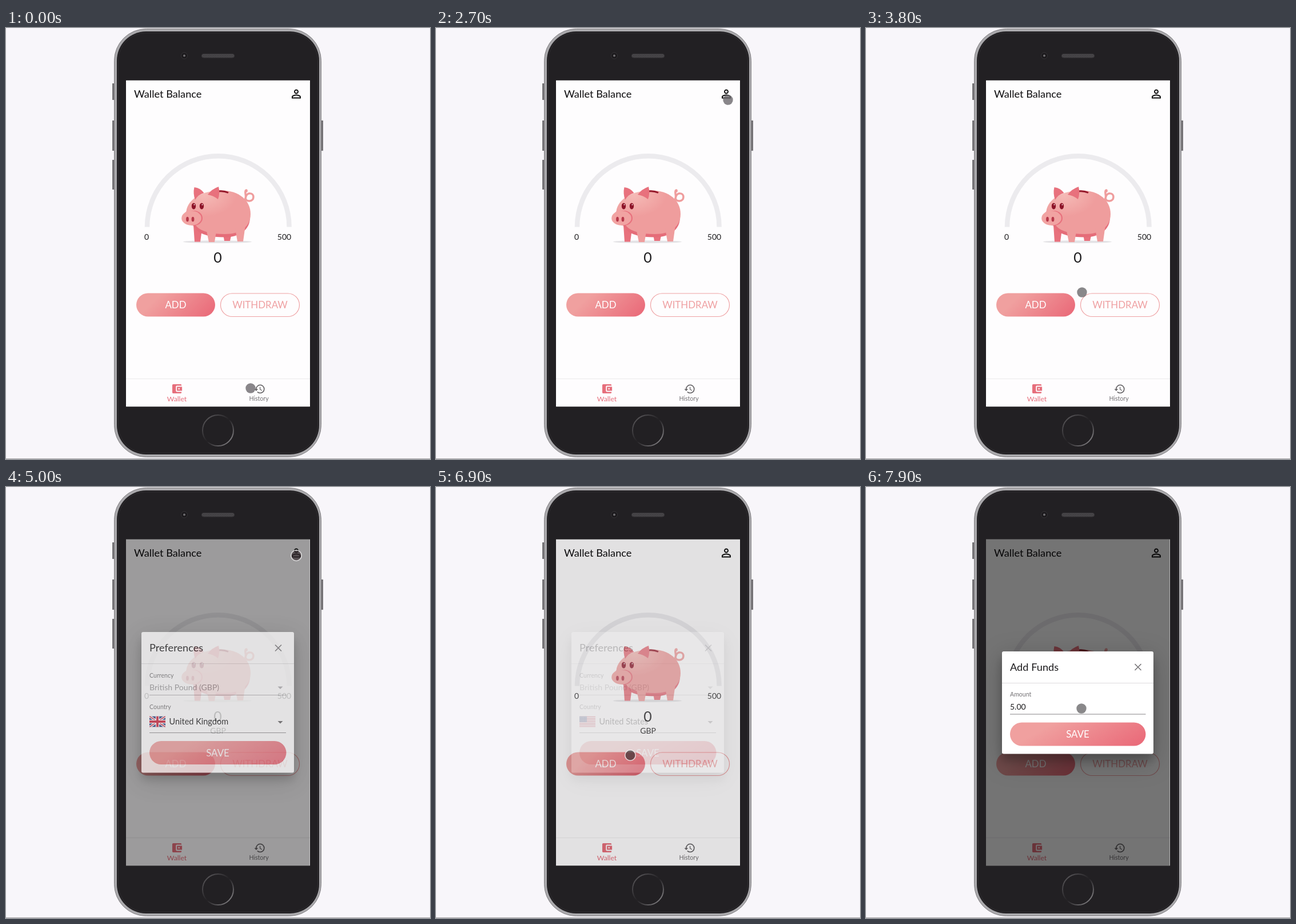
An HTML page for the animation above (8 s loop, 742 by 755 pixels).

```html
<!DOCTYPE html>
<html lang="en">
<head>
<meta charset="utf-8">
<title>Wallet Balance</title>
<style>
html, body { margin: 0; width: 100%; height: 100%; overflow: hidden; background: #f8f6fa }
svg { display: block }
text { font: 14.5px Lato, "Open Sans", sans-serif; fill: #1c1b1d }
.title { font-size: 18.2px }
.btn { font-size: 16.9px; fill: #fff; text-anchor: middle }
.mid { text-anchor: middle }
.num { font-size: 14px }
.label { font-size: 10.6px; fill: #737174 }
.paper { fill: #fff; filter: drop-shadow(0 12px 8px rgba(0,0,0,.2)) drop-shadow(0 10px 22px rgba(0,0,0,.22)) }
.x { stroke: #777578; stroke-width: 1.6 }
</style>
</head>
<body>
<svg width="742" height="755" viewBox="0 0 742 755">
<defs>
  <linearGradient id="pink" x1="0" y1=".35" x2="1" y2=".65">
    <stop offset=".2" stop-color="#f0a09f"/><stop offset="1" stop-color="#ea6d7b"/>
  </linearGradient>
  <linearGradient id="ring" x1="0" y1="0" x2="1" y2="1">
    <stop offset=".1" stop-color="#575558"/><stop offset=".5" stop-color="#232124"/><stop offset=".9" stop-color="#828083"/>
  </linearGradient>
  <radialGradient id="skin" cx=".28" cy=".1" r=".5">
    <stop offset="0" stop-color="#f5bab6"/><stop offset="1" stop-color="#ef9d9d"/>
  </radialGradient>
  <pattern id="mesh" width="3" height="3" patternUnits="userSpaceOnUse">
    <path d="M0 0h3v3H0z" fill="#4b494c"/><path d="M0 0h1v1H0zM1.5 1.5h1v1h-1z" fill="#2d2b2e"/>
  </pattern>
  <clipPath id="screen"><path d="M210 91.5h322v572H210z"/></clipPath>
  <path id="body" d="M315.500 322C317 298 348 284.500 376 284.500C408 284.500 428 302 428 326C428 348 410 361 383 361C360 361 342 357 333 347Z"/>
  <symbol id="uk" viewBox="0 0 28 19">
    <path d="M0 0h28v19H0z" fill="#25397c"/>
    <path d="M0 0L28 19M28 0L0 19" stroke="#fff" stroke-width="4"/>
    <path d="M0 0L28 19M28 0L0 19" stroke="#cf2740" stroke-width="1.5"/>
    <path d="M14 0v19M0 9.5h28" stroke="#fff" stroke-width="6.4"/>
    <path d="M14 0v19M0 9.5h28" stroke="#cf2740" stroke-width="3.8"/>
  </symbol>
  <symbol id="us" viewBox="0 0 28 19">
    <path d="M0 0h28v19H0z" fill="#fff"/>
    <path d="M14 0v19" stroke="#c8354a" stroke-width="28" stroke-dasharray="1.46"/>
    <path d="M0 0h13v10.2H0z" fill="#36427c"/>
    <path d="M1 2h11M1 5h11M1 8h11" stroke="#fff" stroke-dasharray="1 1.5"/>
  </symbol>
</defs>

<!-- Phone -->
<path d="M0 754.5h742" stroke="#a3a1a4"/>
<path d="M186 97h5v29h-5zM186 162h5v53h-5zM186 231h5v52h-5zM550 162h5v53h-5z" fill="#757376"/>
<rect x="189.5" y="1.5" width="362" height="750" rx="56" fill="#aaa9ac" stroke="#828083"/>
<rect x="194" y="6" width="354" height="741" rx="51" fill="#222023"/>
<rect x="196.5" y="8.5" width="349" height="736" rx="48.5" fill="none" stroke="#2e2c2f"/>
<rect x="342.5" y="45.5" width="57" height="6.5" rx="3.2" fill="url(#mesh)" stroke="#3b393c"/>
<circle cx="312" cy="48.5" r="5.5" fill="#1b191c" stroke="#363437"/>
<circle cx="312" cy="48.5" r="2" fill="#6f6d70"/>
<circle cx="371" cy="705" r="27" fill="none" stroke="url(#ring)" stroke-width="2"/>

<g clip-path="url(#screen)">
  <path d="M210 91.5h322v572H210z" fill="#fefdfe"/>
  <text class="title" x="224" y="121.7" style="fill:#0c0b0d">Wallet Balance</text>
  <path transform="translate(496 103.5)" fill="#111" d="M12 5.9a2.1 2.1 0 1 1 0 4.2 2.1 2.1 0 0 1 0-4.2m0 9c2.97 0 6.1 1.46 6.1 2.1v1.1H5.9V17c0-.64 3.13-2.1 6.1-2.1M12 4C9.79 4 8 5.79 8 8s1.79 4 4 4 4-1.79 4-4-1.79-4-4-4zm0 9c-2.67 0-8 1.34-8 4v3h16v-3c0-2.66-5.33-4-8-4z"/>

  <path d="M247 348.5a124.3 124.3 0 0 1 248.6 0" fill="none" stroke="#ecebee" stroke-width="8.5"/>
  <text class="num mid" x="246" y="371">0</text>
  <text class="num mid" x="487" y="371">500</text>

  <!-- Piggy bank -->
  <ellipse cx="370" cy="374.5" rx="60" ry="2.3" fill="#e3e2e5"/>
  <path d="M328 345h16l-4 29.5h-10zM379 355h17l-4 18h-10z" fill="#e8717d"/>
  <use href="#body" x="-1" y="5.5" fill="#e56d79"/>
  <use href="#body" fill="url(#skin)"/>
  <path d="M350 350h19l-4 25h-10zM400 345h19l-4 29h-10z" fill="#ef9d9d"/>
  <path d="M372 286q9-1 17 2.5" fill="none" stroke="#951a2c" stroke-width="3"/>
  <path d="M414 304c7-2 6-9 5-14c-1-7 3-7 2-4M419 298c1 7 14 7 14-2c0-8-11-8-13-1" fill="none" stroke="#ef9d9d" stroke-width="3.5" stroke-linecap="round"/>
  <path d="M329.5 279Q340 280 346.5 289Q336 292 331 301Q327 290 329.5 279ZM372 278Q360 282 353 292Q362 293 371 300Q375 289 372 278Z" fill="#e8717d"/>
  <g fill="#8e1428">
    <ellipse cx="328.5" cy="312" rx="3.7" ry="5.5"/><ellipse cx="342.5" cy="312" rx="3.7" ry="5.5"/>
  </g>
  <g fill="#fff"><circle cx="329.5" cy="309.5" r="1"/><circle cx="343.5" cy="309.5" r="1"/></g>
  <ellipse cx="329" cy="333" rx="15" ry="13" fill="#e8717d"/>
  <ellipse cx="324.5" cy="333" rx="17.3" ry="12.7" fill="#f1a3a2"/>
  <g fill="#b8384a">
    <ellipse cx="317.5" cy="335" rx="2.4" ry="4.2"/><ellipse cx="327" cy="335" rx="2.4" ry="4.2"/>
  </g>

  <text class="mid" x="370.5" y="411.3" style="font-size:25px">0</text>
  <text id="unit" class="num mid" x="371" y="431.5">GBP</text>

  <rect x="228" y="464.5" width="138" height="41" rx="20.5" fill="url(#pink)"/>
  <text class="btn" x="297" y="491">ADD</text>
  <rect x="375.5" y="465" width="138" height="40.5" rx="20.2" fill="none" stroke="#efa2a4" stroke-width="1.2"/>
  <text class="btn" x="444.5" y="491" style="fill:#efa0a2">WITHDRAW</text>

  <path d="M210 614.5h322" stroke="#efeef0" stroke-width="1.5"/>
  <path transform="translate(288.3 621.2) scale(.9)" fill="#e66f7c" d="M21 18v1c0 1.1-.9 2-2 2H5c-1.11 0-2-.9-2-2V5c0-1.1.89-2 2-2h14c1.1 0 2 .9 2 2v1h-9c-1.11 0-2 .9-2 2v8c0 1.1.89 2 2 2h9zm-9-2h10V8H12v8zm4-2.5c-.83 0-1.5-.67-1.5-1.5s.67-1.5 1.5-1.5 1.5.67 1.5 1.5-.67 1.5-1.5 1.5z"/>
  <text class="mid" x="299" y="653.5" style="font-size:12.2px;fill:#e66f7c">Wallet</text>
  <path transform="translate(433.5 622) scale(.87)" fill="#666467" d="M13 3a9 9 0 0 0-9 9H1l3.89 3.89.07.14L9 12H6c0-3.87 3.13-7 7-7s7 3.13 7 7-3.13 7-7 7c-1.93 0-3.68-.79-4.94-2.06l-1.42 1.42A8.954 8.954 0 0 0 13 21a9 9 0 0 0 0-18zm-1 5v5l4.28 2.54.72-1.21-3.5-2.08V8H12z"/>
  <text class="label mid" x="442.5" y="653">History</text>

  <path id="shade" d="M210 91.5h321.5v572H210z"/>

  <g id="prefs">
    <rect class="paper" x="237" y="254" width="267" height="246.5" rx="3"/>
    <text class="title" x="251" y="288">Preferences</text>
    <path class="x" d="M471 276.5l11 11m0-11l-11 11"/>
    <path d="M237 309.5h267" stroke="#dddcde"/>
    <text class="label" x="251" y="334">Currency</text>
    <text x="251" y="356" style="font-size:14.1px;fill:#9b999c">British Pound (GBP)</text>
    <path d="M475.5 349.5h9l-4.5 4.5z" fill="#b0aeb1"/>
    <path d="M251 364.5h239" stroke="#b3b1b4"/>
    <text id="countryLabel" class="label" x="251" y="388.5">Country</text>
    <use id="flag" href="#uk" x="251" y="401.5" width="28" height="19"/>
    <text id="country" x="285.5" y="415.5"></text>
    <path id="arrow" d="M475.5 410h9l-4.5 4.5z" fill="#666467"/>
    <path d="M251 430.5h239" stroke="#8f8d90"/>
    <path id="focus" stroke="#ea6d7b" stroke-width="2"/>
    <rect x="251" y="445" width="239.5" height="41" rx="20.5" fill="url(#pink)"/>
    <text class="btn" x="370.5" y="471.5">SAVE</text>
    <g id="menu">
      <rect class="paper" x="235" y="379" width="256" height="112" rx="3"/>
      <path id="pick" d="M235 387h256v48H235z" opacity=".1"/>
      <use href="#uk" x="251" y="401.5" width="28" height="19"/>
      <text x="285.5" y="415.5">United Kingdom</text>
      <use href="#us" x="251" y="449.5" width="28" height="19"/>
      <text x="285.5" y="463.5">United States</text>
    </g>
  </g>

  <g id="funds">
    <rect class="paper" x="238" y="288" width="265" height="179.5" rx="3"/>
    <text class="title" x="252" y="321.5">Add Funds</text>
    <path class="x" d="M470.5 310l11 11m0-11l-11 11"/>
    <path d="M238 343.5h265" stroke="#dddcde"/>
    <text class="label" x="252" y="367">Amount</text>
    <text class="num" x="252" y="389.5">5.00</text>
    <path d="M252 398h237.5" stroke="#858386"/>
    <rect x="252" y="412.5" width="237.5" height="41" rx="20.5" fill="url(#pink)"/>
    <text class="btn" x="370.5" y="438.5">SAVE</text>
  </g>
  <circle id="dot" stroke-width="1.6"/>
</g>
</svg>
<script>
const el = Object.fromEntries([...document.querySelectorAll('svg [id]')].map(e => [e.id, e]));

// Pointer stops: time, x, y
const stops = [
  [0, 428, 631], [1650, 428, 631], [2450, 511, 126], [2850, 511, 126],
  [3350, 378, 463], [4150, 378, 463], [4700, 508, 120], [5080, 508, 120],
  [5500, 381, 419], [5750, 381, 419], [6150, 372, 457], [6350, 372, 457],
  [6700, 340, 470], [7250, 340, 470], [7700, 377, 388], [8000, 377, 388]
];
const presses = [[2750, 2900], [3420, 3560], [4850, 5080], [5580, 5680],
  [6180, 6320], [6730, 6960], [7050, 7220]];

const clamp = v => Math.min(1, Math.max(0, v));
const set = (e, attrs) => { for (const k in attrs) e.setAttribute(k, attrs[k]); };
const show = (e, alpha) => set(e, { opacity: alpha, visibility: alpha > 0 ? 'visible' : 'hidden' });

// cubic-bezier(.4, 0, .2, 1)
function ease(x) {
  let lo = 0, hi = 1;
  for (let i = 0; i < 20; i++) {
    const s = (lo + hi) / 2, r = 1 - s;
    if (1.2 * r * r * s + .6 * r * s * s + s ** 3 < x) lo = s; else hi = s;
  }
  return lo * lo * (3 - 2 * lo);
}
const ramp = (t, start, span) => ease(clamp((t - start) / span));
const fade = (t, open, close) => ramp(t, open, 225) * (1 - ramp(t, close, 195));

function pointer(t) {
  const i = stops.findIndex(s => s[0] > t);
  const [t0, x0, y0] = stops[i - 1], [t1, x1, y1] = stops[i];
  const p = (t - t0) / (t1 - t0), k = p * p * (3 - 2 * p);
  return { cx: x0 + (x1 - x0) * k, cy: y0 + (y1 - y0) * k };
}

function draw() {
  const t = performance.now() % 8000;
  const prefs = Math.max(fade(t, 2800, 3500), fade(t, 4898, 6800));
  const funds = fade(t, 7160, 9000);
  show(el.prefs, prefs);
  show(el.funds, funds);
  show(el.shade, .54 * Math.max(prefs, funds));
  show(el.unit, t >= 4000 ? 1 : 0);

  const american = t >= 6260, open = t >= 5640 && !american;
  el.country.textContent = american ? 'United States' : 'United Kingdom';
  set(el.flag, { href: american ? '#us' : '#uk' });
  set(el.arrow, { transform: open ? 'rotate(180 480 412.2)' : '' });
  el.countryLabel.style.fill = open ? '#b0747a' : '';

  const line = 120 * ramp(t, 5620, 200) * (1 - ramp(t, 6500, 200));
  set(el.focus, { d: `M${370.5 - line} 430h${2 * line}`, visibility: line > .01 ? 'visible' : 'hidden' });

  const grow = ramp(t, 5640, 250), shut = ramp(t, 6260, 200);
  show(el.menu, grow * (1 + grow) / 2 * (1 - shut));
  const sx = .75 + .25 * grow, sy = sx * sx;
  set(el.menu, { transform: `translate(311 411) scale(${sx} ${sy}) translate(-311 -411)` });
  set(el.pick, { transform: t >= 6050 ? 'translate(0 48)' : '' });

  const down = presses.some(([a, b]) => t >= a && t < b);
  set(el.dot, {
    ...pointer(t), r: down ? 9.2 : 8.7,
    fill: down ? 'rgba(55,45,49,.68)' : 'rgba(108,106,109,.8)',
    stroke: down ? 'rgba(255,255,255,.75)' : 'none'
  });
  requestAnimationFrame(draw);
}
draw();
</script>
</body>
</html>
```
